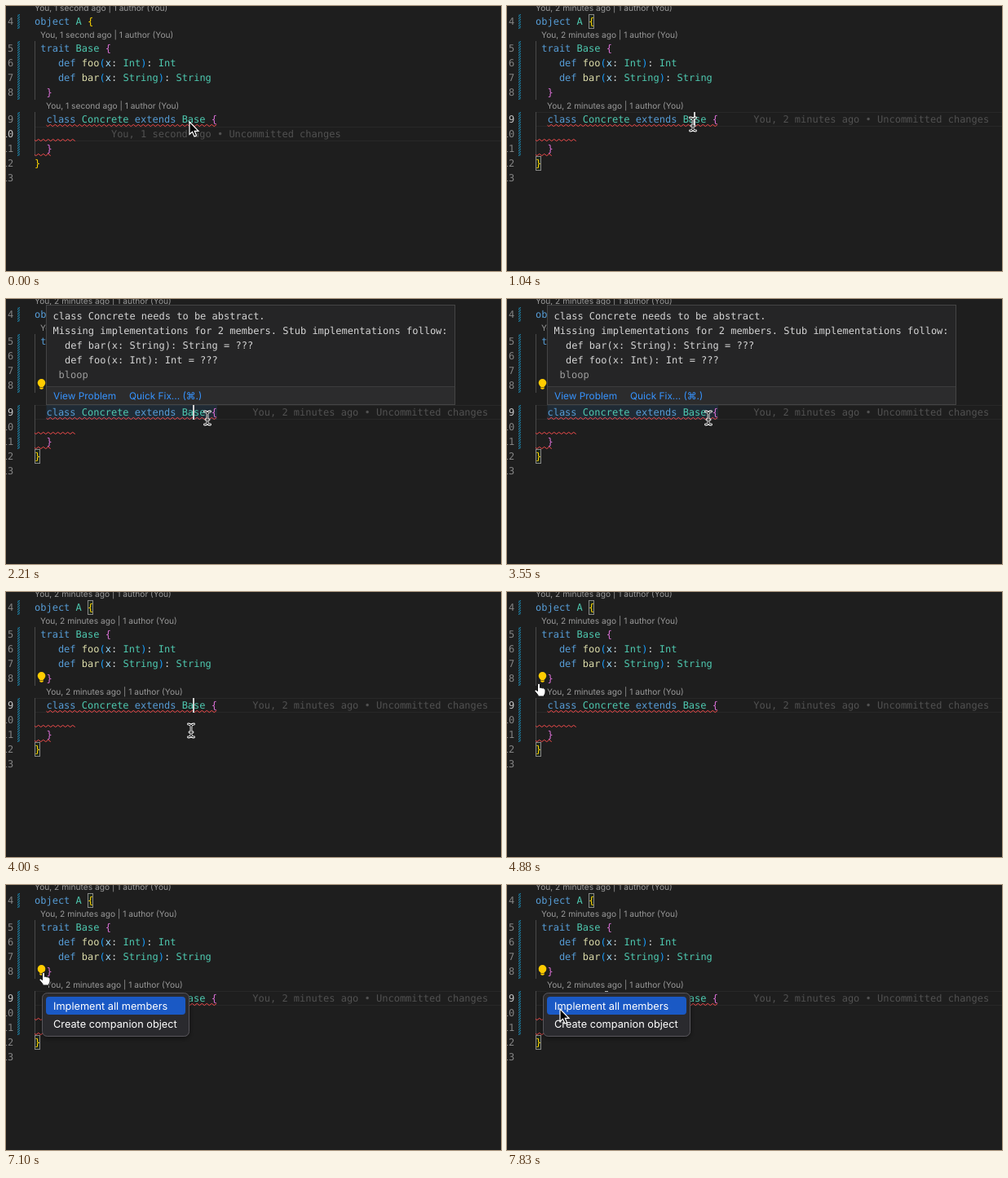
These frames come from a looping animation (607 by 325 pixels, 8 s). An HTML page:

```html
<!DOCTYPE html>
<html lang="en">
<head>
<meta charset="utf-8">
<title>Editor quick fix</title>
<style>
  html, body { margin: 0; width: 100%; height: 100%; overflow: hidden; background: #1e1e1e; }
  svg { display: block; width: 607px; height: 325px; }
  text { font: 12px "DejaVu Sans Mono", monospace; white-space: pre; text-rendering: geometricPrecision; fill: #d4d4d4; }
  .num { fill: #858585; text-anchor: end; }
  .num.active { fill: #c6c6c6; }
  .lens { font: 10.2px Inter, sans-serif; fill: #999; }
  #blame { fill: #515151; }
  .link { font: 11.85px Inter, sans-serif; fill: #3794ff; }
  .item { font: 12.75px Inter, sans-serif; fill: #fff; }
  .wave { fill: none; stroke: #f14c4c; }
</style>
</head>
<body>
<svg id="stage" viewBox="0 0 607 325">
  <defs>
    <pattern id="hatch" width="3" height="3" patternUnits="userSpaceOnUse">
      <path d="M-1 4L4 -1M-1 1L1 -1M2 4L4 2" stroke="#1b81a8" stroke-width="1.06"/>
    </pattern>
    <filter id="shadow" x="-10%" y="-20%" width="120%" height="150%">
      <feDropShadow dx="0" dy="2" stdDeviation="3" flood-opacity=".45"/>
    </filter>
  </defs>

  <path id="current" d="M35 .5H607M35 17.5H607" stroke="#282828"/>
  <rect id="range" x="49.5" y="130" width="209.5" height="18" fill="#264f78" opacity=".25"/>
  <path d="M14 10h3v18h-3zM14 43h3v72h-3zM14 130h3v54h-3z" fill="url(#hatch)"/>
  <path d="M35.5 43V115M35.5 130V184" stroke="#4a4a4a"/>
  <g id="match" fill="#1e281e" stroke="#888">
    <rect x="100.5" y="10.5" width="6" height="17"/>
    <rect x="35.5" y="184.5" width="6" height="17"/>
  </g>
  <g id="code"></g>
  <text id="blame"></text>
  <g id="bulb">
    <circle cx="43.5" cy="102.8" r="4.800" fill="#fc0"/>
    <path d="M41.300 106h4.400v4q-2.200 1.500-4.400 0z" fill="#fc0"/>
    <path d="M41 108.500h5" stroke="#6b5a12" stroke-width=".8"/>
  </g>
  <rect id="caret" x="229" y="130" width="2" height="18" fill="#d0d0d0"/>

  <g id="hover">
    <rect x="49.5" y="7.5" width="501" height="122" fill="#252526" stroke="#454545"/>
    <path d="M50 107h500v22H50z" fill="#2c2c2d"/>
    <path d="M50 107.5H550" stroke="#3c3c3d"/>
    <text class="link" x="58" y="122.500">View Problem</text>
    <text class="link" x="151" y="122.500">Quick Fix... (⌘.)</text>
  </g>

  <rect id="speck" x="120" y="130" width="4" height="1" fill="#ccc"/>
  <g id="menu">
    <rect x="44.5" y="132.500" width="180" height="53" rx="6" fill="#2b292e" stroke="#58565b" filter="url(#shadow)"/>
    <rect x="49" y="137" width="171" height="22" rx="4" fill="#1a59c5"/>
    <text class="item" x="58" y="153">Implement all members</text>
    <text class="item" x="58" y="175">Create companion object</text>
  </g>

  <g id="pointer">
    <path id="arrow" d="M0 0V15.500L3.500 12.300 6 18 8.600 16.900 6.200 11.300H11Z" fill="#000" stroke="#fff" stroke-width="1.2"/>
    <g id="beam" fill="none" stroke-linecap="round">
      <defs>
        <path id="bar" d="M-3.500 -8Q0 -8 0 -5.500Q0 -8 3.500 -8M0 -5.500V5.500M-3.500 8Q0 8 0 5.500Q0 8 3.500 8M-2 2H2"/>
      </defs>
      <use href="#bar" stroke="#fff" stroke-width="2.800"/>
      <use href="#bar" stroke="#111" stroke-width="1"/>
    </g>
    <path id="hand" d="M-1.500 1Q0 -1 1.500 1V5.500Q3 4.500 4 6Q5.500 5 6.300 6.600Q8 6 8 8V11Q8 13 6.500 14.500V16H-1V14.500L-5 9.500Q-5.500 7.500 -3.500 8L-1.500 9.500Z" fill="#fff" stroke="#111" stroke-width="1"/>
  </g>
</svg>

<script>
const $ = id => document.getElementById(id);
const LOOP = 8000, TICK = 147.8, LEAD = 25, LAST_TICK = 53;
const CHAR = 7.224, LEFT = 35;
const colX = col => LEFT + col * CHAR;

function add(parent, tag, attrs, content = '') {
  const el = document.createElementNS('http://www.w3.org/2000/svg', tag);
  for (const name in attrs) el.setAttribute(name, attrs[name]);
  el.textContent = content;
  return parent.appendChild(el);
}

// Source code: line number, top, column, text
const lines = [
  [4, 10, 0, 'object A {'],
  [5, 43, 1, 'trait Base {'],
  [6, 61, 4, 'def foo(x: Int): Int'],
  [7, 79, 4, 'def bar(x: String): String'],
  [8, 97, 2, '}'],
  [9, 130, 2, 'class Concrete extends Base {'],
  [10, 148, 0, ''],
  [11, 166, 2, '}'],
  [12, 184, 0, '}'],
  [13, 202, 0, ''],
];
const brackets = ['#ffd700', '#da70d6', '#179fff'];
let depth = 0;

function color(token) {
  if (/[{(]/.test(token)) return brackets[depth++];
  if (/[})]/.test(token)) return brackets[--depth];
  if (/^(object|trait|def|class|extends)$/.test(token)) return '#569cd6';
  if (/^[A-Z]/.test(token)) return '#4ec9b0';
  if (/^(foo|bar)$/.test(token)) return '#dcdcaa';
  return token === 'x' ? '#9cdcfe' : '#d4d4d4';
}

const numbers = {};
for (const [num, top, col, source] of lines) {
  const y = top + 13;
  numbers[num] = add($('code'), 'text', { class: 'num', x: 9.2, y }, num);
  const row = add($('code'), 'text', { x: colX(col), y });
  for (const token of source.match(/\w+|\s+|[^\w\s]/g) || [])
    add(row, 'tspan', { style: 'fill:' + color(token) }, token);
}

const lenses = [[35, 6], [42, 39], [49, 126]].map(([x, y]) => add($('code'), 'text', { class: 'lens', x, y }));

// Error underline: 6 px period, first valley 1.75 px in
function wave(from, to, top) {
  let d = `M${from} ${top + 1.2}`;
  for (let x = from + 1.75, low = true; x <= to; x += 3, low = !low) d += `L${x} ${top + (low ? 2.6 : 0.4)}`;
  add($('code'), 'path', { class: 'wave', d });
}
wave(49.5, 259.5, 145);
wave(35, 86.5, 163);
wave(35, 57.5, 181);

[
  'class Concrete needs to be abstract.',
  'Missing implementations for 2 members. Stub implementations follow:',
  '  def bar(x: String): String = ???',
  '  def foo(x: Int): Int = ???',
].forEach((s, i) => add($('hover'), 'text', { x: 57.5, y: 25 + 18 * i }, s));
add($('hover'), 'text', { x: 64.5, y: 97, style: 'fill:#9d9d9d' }, 'bloop');

// Pointer path: tick, x, y, shape from there on
const path = [
  [0, 225, 142, 'arrow'], [1, 228, 150, 'beam'], [3, 228, 150, 'beam'], [7, 228, 145, 'beam'],
  [10, 228, 145, 'beam'], [12, 247, 146, 'beam'], [26, 247, 146, 'beam'], [27, 227, 170, 'beam'],
  [28, 218, 205, 'beam'], [29, 190, 219, 'beam'], [31, 95, 165, 'beam'], [33, 39, 112, 'hand'],
  [35, 43, 105, 'hand'], [36, 47, 112, 'arrow'], [37, 50, 130, 'arrow'], [39, 43, 106, 'hand'],
  [40, 43, 106, 'hand'], [41, 48, 107, 'arrow'], [43, 58, 108, 'arrow'], [46, 46, 107, 'hand'],
  [48, 46, 107, 'hand'], [49, 62, 108, 'arrow'], [51, 114, 113, 'arrow'], [53, 65, 152, 'arrow'],
];
const caretOn = [[7, 10], [14, 17], [20, 24], [27, 31], [34, 38], [41, 42]];
const show = (id, on) => $(id).style.display = on ? '' : 'none';

function movePointer(tick) {
  const i = path.findLastIndex(key => key[0] <= tick);
  const [t0, x0, y0, shape] = path[i];
  const [t1, x1, y1] = path[i + 1] || [t0 + 1, x0, y0];
  const k = (tick - t0) / (t1 - t0);
  $('pointer').setAttribute('transform', `translate(${x0 + (x1 - x0) * k} ${y0 + (y1 - y0) * k})`);
  for (const id of ['arrow', 'beam', 'hand']) show(id, id === shape);
}

function draw(tick) {
  const clicked = tick >= 7;
  const hovering = tick >= 14 && tick < 27;
  const age = clicked ? 'You, 2 minutes ago' : 'You, 1 second ago';
  for (const lens of lenses) lens.textContent = age + ' | 1 author (You)';
  $('blame').textContent = age + ' • Uncommitted changes';
  $('blame').setAttribute('x', colX(clicked ? 37 : 13));
  $('blame').setAttribute('y', clicked ? 143 : 161);
  $('current').setAttribute('transform', `translate(0 ${clicked ? 130 : 148})`);
  numbers[9].classList.toggle('active', clicked);
  numbers[10].classList.toggle('active', !clicked);

  show('match', clicked);
  show('bulb', tick >= 9);
  show('caret', caretOn.some(([on, off]) => tick >= on && tick < off));
  show('range', hovering);
  show('hover', hovering);
  $('hover').style.opacity = tick === 14 ? 0.6 : 1;
  show('menu', tick >= 47);
  show('speck', tick >= 52);
  movePointer(tick);
}

let last = -1;
function loop() {
  const tick = Math.min(LAST_TICK, Math.floor((performance.now() % LOOP + LEAD) / TICK));
  if (tick !== last) draw(last = tick);
  requestAnimationFrame(loop);
}
loop();
</script>
</body>
</html>
```
